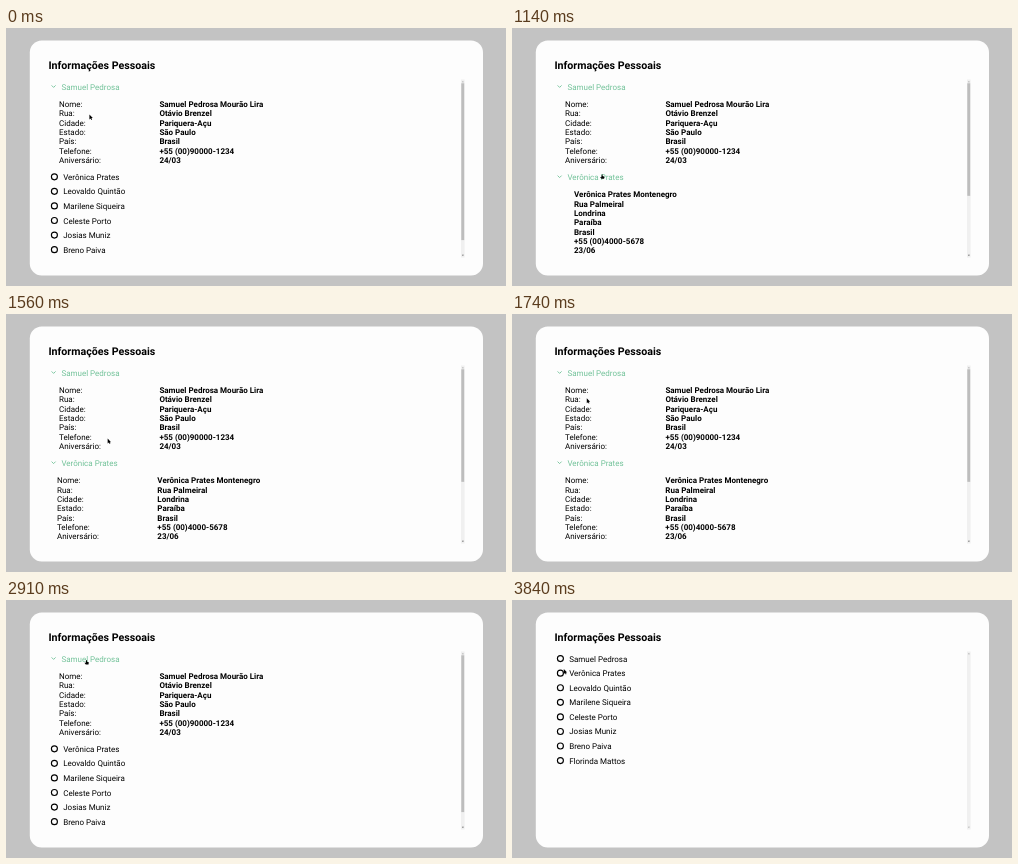
An HTML page for the animation above (3.87 s loop, 500x258 px).

```html
<!DOCTYPE html>
<html lang="pt-BR">
<head>
<meta charset="utf-8">
<title>Informações Pessoais</title>
<style>
  html, body { margin: 0; width: 100%; height: 100%; overflow: hidden; background: #c3c3c3; }
  svg { display: block; width: 500px; height: 258px; }
  text { font: 8px Roboto, sans-serif; white-space: pre; text-rendering: geometricPrecision; }
  .bold { font-weight: 700; }
  .title { font-size: 10.67px; }
  .open { fill: #72c299; }
  .ring { fill: none; stroke: #000; stroke-width: 1.15; }
  .chevron { fill: none; stroke: #72c299; stroke-width: .9; }
</style>
</head>
<body>
<svg viewBox="0 0 500 258">
  <clipPath id="view"><rect x="42.2" y="51" width="412" height="178.5"/></clipPath>
  <rect x="23.8" y="12.6" width="453.2" height="234.8" rx="12" fill="#fdfdfd"/>
  <text class="bold title" x="42.4" y="40.8">Informações Pessoais</text>
  <g id="list" clip-path="url(#view)"></g>
  <rect x="455" y="51.5" width="3.6" height="178" fill="#f0f0f0"/>
  <path d="M456 54.2h1.8l-.9-1.3z" fill="#a3a3a3"/>
  <path id="down" d="M456 226.8h1.8l-.9 1.3z"/>
  <rect id="thumb" x="455.3" y="55.3" width="2.9" fill="#bdbdbd"/>
  <path id="cursor"/>
</svg>
<script>
const LOOP = 3870, TOP = 58.7, ROW = 14.57, LINE = 9.33, PANEL = 90.2, TRACK = 173.6;
const OPEN_SECOND = 810, SLIDE = 870, CLOSE_SECOND = 2190, CLOSE_FIRST = 3090;

const people = ['Samuel Pedrosa', 'Verônica Prates', 'Leovaldo Quintão', 'Marilene Siqueira',
  'Celeste Porto', 'Josias Muniz', 'Breno Paiva', 'Florinda Mattos'];
const labels = ['Nome', 'Rua', 'Cidade', 'Estado', 'País', 'Telefone', 'Aniversário'];
const details = [
  ['Samuel Pedrosa Mourão Lira', 'Otávio Brenzel', 'Pariquera-Açu', 'São Paulo', 'Brasil',
    '+55 (00)90000-1234', '24/03'],
  ['Verônica Prates Montenegro', 'Rua Palmeiral', 'Londrina', 'Paraíba', 'Brasil',
    '+55 (00)4000-5678', '23/06']
];

const ARROW = 'M0 0V5L1.2 4 2 5.4 2.7 5 2 3.6H3.4Z';
const HAND = 'M0 0Q.8-.2.8.5V1.7L2.6 2.3 2.3 4.4H-.4L-1.8 2.7-.4 2.8Z';
const rest = { x: 83.4, y: 86.4 }, secondRow = { x: 89.8, y: 146.4 };
const moves = [
  { from: 0, to: 540, ...secondRow },
  { from: 1320, to: 1560, x: 101.8, y: 124.8 },
  { from: 1560, to: 1860, x: 57, y: 57.5 },
  { from: 1860, to: 1980, x: 90.2, y: 147 },
  { from: 2250, to: 2640, x: 80.2, y: 60 },
  { from: 3750, to: 3840, x: 51.8, y: 69 }
];

const $ = id => document.getElementById(id);
const clamp = v => Math.min(1, Math.max(0, v));
const progress = (t, from, to) => clamp((t - from) / (to - from));
const text = (x, y, str, cls = '') => `<text x="${x}" y="${y}" class="${cls}">${str}</text>`;

function panel(i, y) {
  const lines = labels.map((label, k) =>
    text(53, y + k * LINE, label + ':') + text(153.4, y + k * LINE, details[i][k], 'bold'));
  return `<g class="panel${i}">${lines.join('')}</g>`;
}

function row(name, i, opened) {
  const y = TOP + Math.min(i, opened) * PANEL + Math.max(0, i - opened) * ROW;
  return i < opened
    ? `<path class="chevron" d="M45.6 ${y - 1.3}l2 2 2-2"/>`
      + text(55.4, y + 2.9, name, 'open') + panel(i, y + 20.3)
    : `<circle class="ring" cx="48.4" cy="${y - .1}" r="3"/>` + text(57.2, y + 2.9, name);
}

let shown = -1;
function setOpened(n) {
  if (n === shown) return;
  shown = n;
  const content = n * PANEL + (people.length - n) * ROW;
  const scrolls = content > TRACK;
  $('list').innerHTML = people.map((name, i) => row(name, i, n)).join('');
  $('thumb').setAttribute('height', scrolls ? TRACK * TRACK / content : 0);
  $('down').setAttribute('fill', scrolls ? '#505050' : '#a3a3a3');
}

function pointerAt(t) {
  let { x, y } = rest;
  for (const m of moves) {
    const p = progress(t, m.from, m.to);
    x += (m.x - x) * p;
    y += (m.y - y) * p;
  }
  return { x, y };
}

function draw(now) {
  const t = now % LOOP;
  setOpened(t >= CLOSE_FIRST ? 0 : t >= OPEN_SECOND && t < CLOSE_SECOND ? 2 : 1);
  if (shown === 2) {
    const left = (1 - progress(t, SLIDE, SLIDE + 1060)) ** 5;
    document.querySelector('.panel1').setAttribute('transform', `translate(${-400 * left})`);
  }
  const { x, y } = pointerAt(t);
  const overRow = y < 66 || y > 142;
  $('cursor').setAttribute('d', overRow ? HAND : ARROW);
  $('cursor').setAttribute('transform', `translate(${x} ${y})`);
  requestAnimationFrame(draw);
}
draw(performance.now());
</script>
</body>
</html>
```
